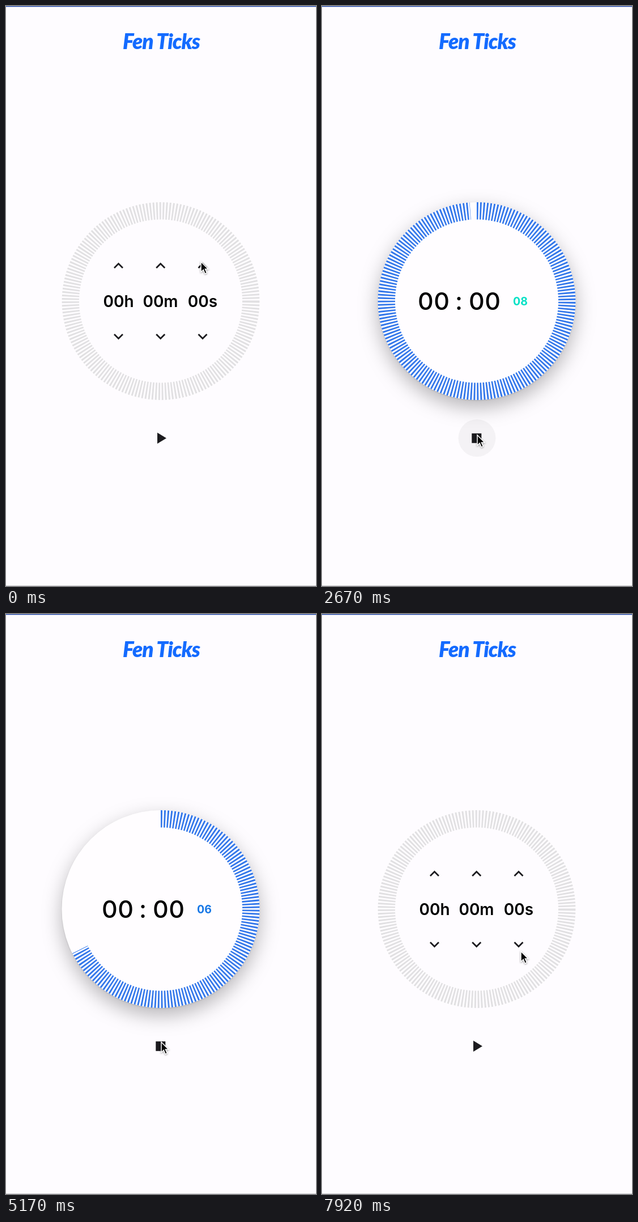
These frames come from a looping animation (547x1023 px, 8000 ms). An HTML page:

```html
<!DOCTYPE html>
<html lang="en">
<head>
<meta charset="utf-8">
<title>Countdown timer</title>
<style>
  html, body { margin: 0; width: 100%; height: 100%; overflow: hidden; background: #fefcff; }
  svg { display: block; width: 100%; height: 100%; }
  text { font-family: Inter, "Open Sans", sans-serif; text-anchor: middle; }
  .logo { font: italic 900 37px Lato, sans-serif; letter-spacing: -1px; fill: #146bff; }
  .unit { font-size: 28px; font-weight: 600; }
  .big { font-size: 43px; font-weight: 500; letter-spacing: .6px; }
  .small { font-size: 19.5px; font-weight: 700; }
  .ticks { fill: none; stroke-width: 30.4; stroke-dasharray: 2.79 2.79; }
  .chevron { fill: none; stroke: #1c1b1f; stroke-width: 2.8; }
  .disc { fill: #fffdff; filter: drop-shadow(0 1px 1px #0002) drop-shadow(0 13px 17px #00000047); }
  .cursor { fill: #000; stroke: #fff; stroke-width: 1.5; filter: drop-shadow(0 1.5px 1.5px #0006); }
</style>
</head>
<body>
<svg viewBox="0 0 547 1023">
  <defs><clipPath id="buttonClip"><rect x="315" y="424" width="63.5" height="68"/></clipPath></defs>
  <rect width="547" height="1023" fill="#fefcff"/>
  <rect width="547" height="1.4" fill="#2347a5"/>
  <rect y="1022" width="547" height="1" fill="#c9c8cc"/>
  <text class="logo" x="274" y="76">Fen Ticks</text>

  <g id="setup">
    <circle class="ticks" cx="273" cy="520.5" r="159.2" stroke="#e1e0e2"/>
    <g id="chevrons"></g>
    <text class="unit" x="198.5" y="530.5">00h</text>
    <text class="unit" x="272.5" y="530.5">00m</text>
    <text class="unit" x="347" y="530.5" id="seconds"></text>
    <path d="M267 752.5L283 762.3L267 772Z" fill="#1c1b1f"/>
  </g>

  <g id="running">
    <circle class="disc" cx="273" cy="520.5" r="174.6"/>
    <path class="ticks" id="arc" stroke="#3478ea"/>
    <text class="big" x="197.3" y="536">00</text>
    <text class="big" x="241.8" y="536">:</text>
    <text class="big" x="287.3" y="536">00</text>
    <text class="small" x="350" y="528" id="left"></text>
    <rect x="264.3" y="753.8" width="17" height="17" fill="#1c1b1f"/>
  </g>

  <circle id="tapRipple" cx="347" cy="458" clip-path="url(#buttonClip)"/>
  <circle id="playRipple" cx="273.5" cy="762"/>
  <path class="cursor" id="cursor" d="M0 0V18.2L4.2 14.3L7.2 21.2L10.4 19.8L7.4 13.1H13Z"/>
</svg>
<script>
const LOOP = 8000, START = 2580, STOP = 6580, TOTAL = 8;
const CENTER = { x: 273, y: 520.5, r: 159.2 };
const $ = id => document.getElementById(id);
const clamp = v => Math.max(0, Math.min(1, v));
const ramp = (t, from, to) => clamp((t - from) / (to - from));
const smooth = v => v * v * (3 - 2 * v);
const mix = (a, b, k) => a + (b - a) * k;
const pad = n => String(n).padStart(2, "0");

const BLUE = [27, 103, 235], TEAL = [0, 228, 196];

// Time, x and y of the pointer's stops.
const POINTER = [
  [0, 344, 451], [1680, 344, 451], [2160, 273, 769], [2250, 274, 765],
  [2540, 274, 765], [2720, 274, 755], [7300, 274, 755], [7900, 351, 595], [LOOP, 351, 595]
];

$("chevrons").innerHTML = [198.5, 272.7, 347].map(x =>
  `<path class="chevron" d="M${x - 7.5} 462l7.5-7.5 7.5 7.5M${x - 7.5} 579l7.5 7.5 7.5-7.5"/>`
).join("");

function fastOutSlowIn(x) {
  let lo = 0, hi = 1, s = .5;
  for (let i = 0; i < 20; i++) {
    s = (lo + hi) / 2;
    const at = 1.2 * (1 - s) ** 2 * s + .6 * (1 - s) * s * s + s ** 3;
    if (at < x) lo = s; else hi = s;
  }
  return 3 * (1 - s) * s * s + s ** 3;
}

function pointerAt(t) {
  const i = Math.max(1, POINTER.findIndex(p => p[0] > t));
  const [a, b] = [POINTER[i - 1], POINTER[i]];
  const k = smooth(ramp(t, a[0], b[0]));
  return [mix(a[1], b[1], k), mix(a[2], b[2], k)];
}

function ripple(el, t, press, release, gone, strength) {
  el.setAttribute("r", mix(10, 33, smooth(ramp(t, press, press + 225))));
  el.setAttribute("fill-opacity", strength * ramp(t, press, press + 150) * (1 - ramp(t, release, gone)));
}

function drawArc(degrees) {
  const { x, y, r } = CENTER, a = degrees * Math.PI / 180;
  const end = `${x + r * Math.sin(a)} ${y - r * Math.cos(a)}`;
  $("arc").setAttribute("d", `M${x} ${y - r}A${r} ${r} 0 ${degrees > 180 ? 1 : 0} 1 ${end}`);
}

function drawCountdown(elapsed) {
  drawArc(Math.min(359.9, 360 * (1 - elapsed / TOTAL)));
  const phase = elapsed % 2;
  const k = fastOutSlowIn(phase < 1 ? phase : 2 - phase);
  $("left").textContent = pad(Math.ceil(TOTAL - elapsed));
  $("left").setAttribute("fill", `rgb(${TEAL.map((c, i) => Math.round(mix(c, BLUE[i], k)))})`);
}

function render(t) {
  const running = t >= START && t < STOP;
  $("running").style.display = running ? "" : "none";
  $("setup").style.display = running ? "none" : "";
  if (running) {
    drawCountdown((t - START) / 1000);
  } else {
    const clicks = t < START ? Math.floor((t - 320) / 125) + 1 : 0;
    $("seconds").textContent = pad(Math.max(0, Math.min(TOTAL, clicks))) + "s";
  }
  ripple($("tapRipple"), t, 240, 1280, 1570, .23);
  if (t < 4500) ripple($("playRipple"), t, 2420, 2560, 2740, .1);
  else ripple($("playRipple"), t, 6430, 6640, 6900, .1);
  $("cursor").setAttribute("transform", `translate(${pointerAt(t)})`);
}

const origin = performance.now();
function frame() {
  render((performance.now() - origin) % LOOP);
  requestAnimationFrame(frame);
}
frame();
</script>
</body>
</html>
```
